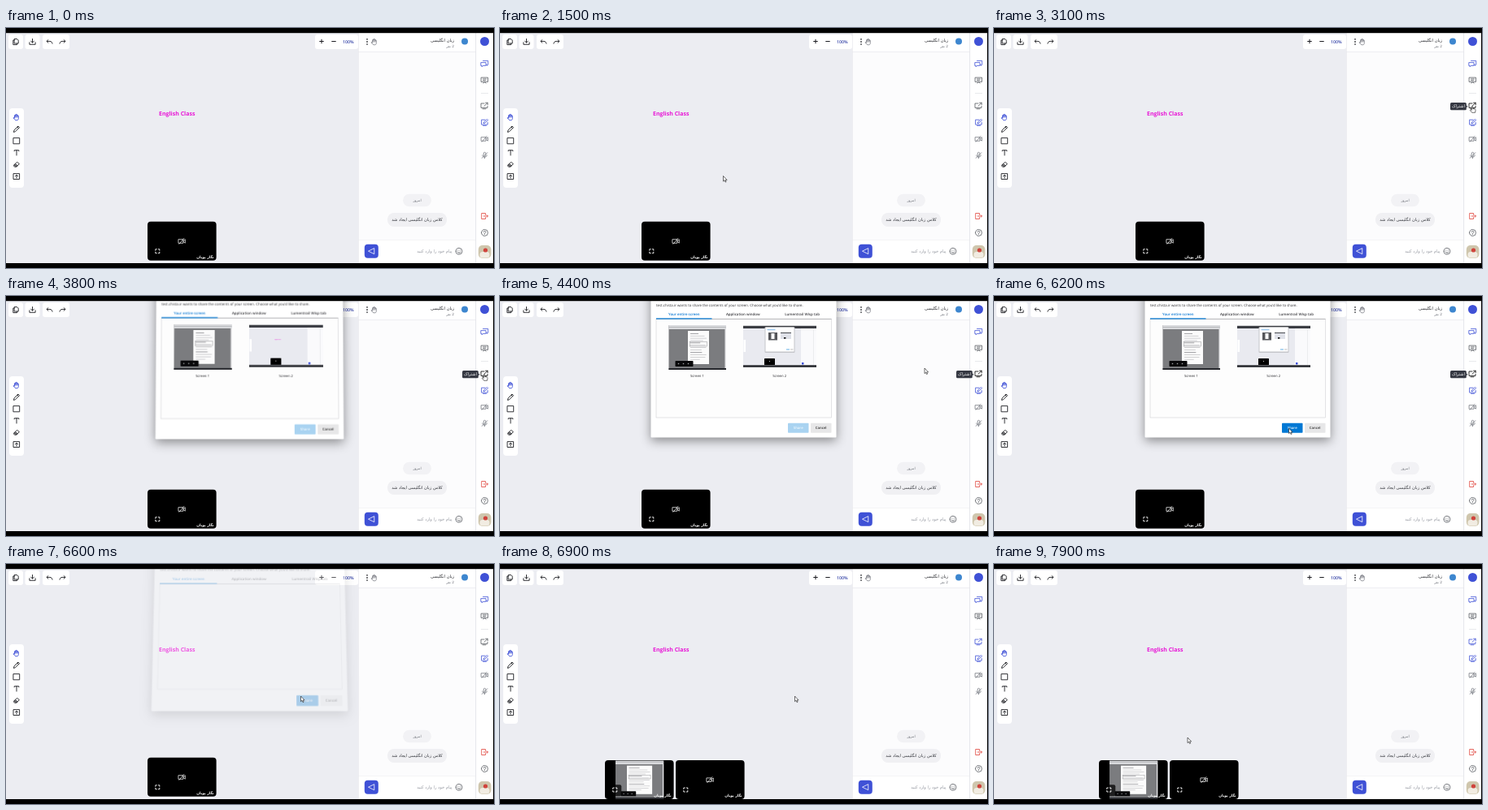
Animation, 600 px wide and 296 px high, one loop 8000 ms. Source, as an HTML page:

```html
<!DOCTYPE html>
<html lang="en">
<head>
<meta charset="utf-8">
<title>Online class: sharing a screen</title>
<style>
  html, body { margin: 0; width: 100%; height: 100%; overflow: hidden; background: #000; }
  #stage { position: fixed; left: 0; top: 0; width: 600px; height: 296px; overflow: hidden; contain: strict; }
  svg, #dialog { position: absolute; left: 0; top: 0; width: 600px; height: 296px; }
  svg { display: block; overflow: hidden; }
  #dialog { transform-origin: 299.5px 96.5px; }
  #dialog svg { overflow: visible; filter: drop-shadow(0 4px 6.5px rgba(0,0,0,.42)); }
  text { font-family: "Open Sans", "Noto Sans", sans-serif; text-rendering: geometricPrecision; }
  .fa { font-family: "DejaVu Sans", sans-serif; direction: rtl; }
  .mid { text-anchor: middle; }
</style>
</head>
<body>
<div id="stage">
  <svg id="room" viewBox="0 0 600 296"></svg>
  <div id="dialog"><svg id="sheet" viewBox="0 0 600 296"></svg></div>
  <svg id="front" viewBox="0 0 600 296"></svg>
</div>
<script>
const LOOP = 8000, STEP = 100;
const BLUE = '#3f51d6', GREY = '#55585f', INK = '#1c1d22';
const $ = id => document.getElementById(id);

const box = (x, y, w, h, fill, r = 0, extra = '') =>
  `<rect x="${x}" y="${y}" width="${w}" height="${h}" rx="${r}" fill="${fill}" ${extra}/>`;
const dot = (x, y, r, fill) => `<circle cx="${x}" cy="${y}" r="${r}" fill="${fill}"/>`;
const label = (x, y, size, fill, str, cls = '', weight = 400) =>
  `<text x="${x}" y="${y}" font-size="${size}" fill="${fill}" class="${cls}" font-weight="${weight}">${str}</text>`;
const icon = (name, x, y, color, width = .9, id = '') =>
  `<path ${id && `id="${id}"`} transform="translate(${x} ${y})" d="${ICONS[name]}" fill="none" stroke="${color}"
    stroke-width="${width}" stroke-linecap="round" stroke-linejoin="round"/>`;

const ICONS = {
  copy: 'M-1.5,-3.5H1.6L3.2,-1.9V2H-1.5ZM-1.6,-2H-3.2V3.6H1.6V2.2',
  save: 'M0,-3.6V1M-1.9,-.9L0,1.1L1.9,-.9M-3.6,.8V3.3H3.6V.8',
  undo: 'M-1.6,-2.4L-3.5,-.6L-1.6,1.2M-3.4,-.6H.4C2,-.6 3.2,.4 3.5,2.2',
  redo: 'M1.6,-2.4L3.5,-.6L1.6,1.2M3.4,-.6H-.4C-2,-.6 -3.2,.4 -3.5,2.2',
  plus: 'M-2.3,0H2.3M0,-2.3V2.3',
  minus: 'M-2.3,0H2.3',
  palm: 'M-2.5,.6V-2a.6.6 0 011.2 0V-3a.6.6 0 011.2 0V-2.6a.6.6 0 011.2 0V-1.5a.6.6 0 011.2 0V1.5C2.3,3.3 1.3,3.8 0,3.8C-1.6,3.8 -2.4,3 -4,.8C-3.6,.2 -3,.4 -2.5,1ZM-1.3,-2V0M-.1,-2.6V0M1.1,-2V0',
  pencil: 'M-3.5,3.5L-2.9,1.2L2,-3.6L3.6,-2L-1.2,2.9ZM1,-2.6L2.6,-1',
  square: 'M-3.7,-3.6H3.7V3.6H-3.7Z',
  type: 'M-2.8,-2V-3H2.8V-2M0,-3V3.2',
  eraser: 'M-3.4,.9L.6,-3L3.4,-.8L-.4,2.8H-2.2ZM-1.6,-.8L1.2,1.4M-2.4,0L.3,2.1M-2.9,.6L-.4,2.5',
  upload: 'M-3.6,-3.4H3.6V3.5H-3.6ZM0,2V-1.6M-1.6,-.2L0,-1.8L1.6,-.2',
  chat: 'M-2,-3.6H4.2V1.2H3.2V2.4L1.8,1.2M-4.3,-1.4H1.6V2.4H-2L-3.4,3.9V2.4H-4.3Z',
  board: 'M-4,-3.4H4V1.9H-4ZM-2,-1.6H2M-2,.1H1M-1.6,3.7L0,2L1.6,3.7',
  share: 'M0,-3H-4V2.4H4V.4M-2,3.8H2M0,.2L4,-3.6M1.6,-3.8H4.2V-1.3',
  edit: 'M.6,-3.3H-3.9V2.6H3.7V0M-2,3.9H2M-1.2,.8L-.8,-.7L3,-4L4.2,-2.8L.4,.5Z',
  camera: 'M-4,-2.3H1.6V2.3H-4ZM1.6,-.5L4,-2.2V2.2L1.6,.5M-3.4,3.4L2.6,-3.6',
  mic: 'M-1.3,-2.4a1.3 1.3 0 012.6 0V.2a1.3 1.3 0 01-2.6 0ZM-2.8,0C-2.6,3 2.6,3 2.8,0M0,2.3V3.8M-3.3,3.4L3.3,-3.3',
  exit: 'M1,-1.7V-3.5H-3.8V3.5H1V1.7M-1.2,0H4M2.5,-1.5L4,0L2.5,1.5',
  help: 'M-4,0a4 4 0 108 0a4 4 0 10-8 0M-1.3,-.9C-1.3,-2.7 1.4,-2.6 1.3,-.9C1.2,0 0,0 0,1M0,2.1V2.2',
  smile: 'M-3.9,0a3.9 3.9 0 107.8 0a3.9 3.9 0 10-7.8 0M-1.9,.9C-1.2,2.5 1.2,2.5 1.9,.9M-1.3,-1.2V-1M1.3,-1.2V-1',
  send: 'M3.4,-3.4L-3.5,0L3.4,3.4Z',
  full: 'M-2.5,-1V-2.5H-1M1,-2.5H2.5V-1M2.5,1V2.5H1M-1,2.5H-2.5V1'
};

// A desktop with a document open, 70.5 by 55 units
function desktop(pageX, pageW) {
  let s = box(0, 0, 70.5, 55, '#7b7c7f') + box(0, 0, 70.5, 5, '#d9dadd') +
    box(0, 2, 70.5, .5, '#9a9ca0') + box(69, 5, 1.5, 48, '#e8e8ea') +
    box(pageX, 7, pageW, 41, '#fbfbfb');
  for (let i = 0; i < 12; i++) {
    const w = (pageW - 6) * (.5 + .5 * Math.abs(Math.sin(i * 2.3)));
    s += box(pageX + 3, 10 + i * 2.9, w, .6, i % 4 ? '#b4b4b8' : '#6b6b70');
  }
  s += box(pageX + 2.5, 20.5, pageW - 5, 5.5, 'none', 0, 'stroke="#77787c" stroke-width=".4"');
  s += box(0, 53, 70.5, 2, '#25272c') + box(8, 44, 22, 7, '#08080a', .8);
  return s + [12, 18, 24].map(x => dot(x, 47.5, .8, '#a6a7aa')).join('');
}

const tileMarks = icon('full', 12, 36.3, '#fff', .9) +
  label(81.3, 44.8, 4.4, '#fff', 'نگار پویان', 'fa', 700);
const tile = (x, y, inner) =>
  `<g transform="translate(${x} ${y})">${box(-.3, -.2, 84.6, 48, '#000', 4)}${inner}${tileMarks}</g>`;
const cameraTile = (x, y) => tile(x, y, icon('camera', 42, 24, '#e8e8e8', .8));

function drawRoom() {
  const tools = ['palm', 'pencil', 'square', 'type', 'eraser', 'upload'];
  const side = [['chat', 44, BLUE], ['board', 64.5, GREY], ['edit', 116.5, BLUE], ['camera', 137, '#777a82'],
    ['mic', 157, '#777a82'], ['exit', 232, '#e0433a'], ['help', 252.5, GREY]];
  $('room').innerHTML =
    box(0, 6, 600, 285, '#ecedf2') +
    box(3, 8, 18, 18, '#fff', 3) + box(23.5, 8, 18, 18, '#fff', 3) + box(45, 8, 33, 18, '#fff', 3) +
    box(380, 8, 53, 18, '#fff', 3) +
    icon('copy', 12, 17, INK) + icon('save', 32.5, 17, INK) + icon('undo', 53.5, 17, INK) + icon('redo', 69.5, 17, INK) +
    icon('plus', 388, 16.5, INK, 1) + icon('minus', 403, 16.5, INK, 1) +
    label(414, 18.5, 5.3, '#3645a8', '100%', '', 600) +
    box(4, 99, 18, 98, '#fff', 4) +
    tools.map((n, i) => icon(n, 13, 110 + i * 14.6, i ? INK : BLUE)).join('') +
    label(188, 108.2, 7, '#e815d6', 'English Class', '', 700) +

    box(433, 6, 167, 285, '#fcfcfd') + box(433, 6, 144, 23, '#fff') + box(433, 261, 144, 30, '#fff') +
    box(578, 6, 22, 285, '#fff') +
    box(433, 29, 144.5, .6, '#e7e7ec') + box(433, 261, 144.5, .6, '#ededf1') +
    box(577.3, 6, .8, 284, '#dfe0e6') + box(433, 6, .6, 284, '#e4e4ea') +
    [13.8, 16.9, 20].map(y => dot(444, y, .85, INK)).join('') +
    icon('palm', 453, 17, '#6b6e76', .7) +
    label(551, 16.6, 5.2, '#26272c', 'زبان انگلیسی', 'fa') +
    label(551, 24.2, 4.3, '#6f727a', '2 نفر', 'fa') +
    dot(564, 16.5, 4, '#3d86cf') + dot(588.5, 16.5, 5.5, BLUE) +

    box(488, 204.7, 35, 15.5, '#f2f2f5', 7.7) +
    label(505.5, 214, 4.4, '#6f727a', 'امروز', 'fa mid') +
    box(469, 228, 73, 17, '#f0f0f3', 8) +
    label(505.5, 238.3, 5.15, '#34363c', 'کلاس زبان انگلیسی ایجاد شد', 'fa mid') +
    box(440.8, 266.8, 17, 16.9, BLUE, 4) + icon('send', 449, 275.2, '#fff', .8) +
    label(548.5, 276.6, 5.15, '#9699a1', 'پیام خود را وارد کنید', 'fa') +
    icon('smile', 557, 275.3, GREY, .8) +

    side.map(([n, y, c]) => icon(n, 588.5, y, c, .8)).join('') +
    box(584, 80, 9, .6, '#d9dae0') + icon('share', 588, 96, GREY, .8, 'shareIcon') +
    box(580.8, 268, 15.6, 16, '#cfc6ad', 5) + box(582.5, 276, 12, 7.5, '#f1ece2', 3.5) +
    dot(589.5, 274, 2.6, '#d0433c') +

    `<g id="alone">${cameraTile(174.3, 239)}</g>
     <g id="sharing">${cameraTile(216.3, 242.2)}${tile(129.3, 242.2,
       `<g transform="translate(12.7 .5) scale(.84 .856)">${desktop(16.7, 37)}</g>` +
       box(4, 30, 16, 14, '#000', 2, 'opacity=".75"'))}</g>`;
}

function drawSheet() {
  const tab = (x, str, color) => label(x, 24.2, 4.4, color, str, 'mid', 600);
  const popup = box(325.5, 38.5, 37, 31.5, '#c4c5ca', 1) + box(326.5, 38.5, 35, 30, '#fff') +
    box(328.5, 41.5, 10, .6, '#2a86d6') + box(330, 45, 11, 9.5, '#55565a') + box(333.5, 46, 4, 7, '#fff') +
    box(345, 45, 13, 8, '#dfe1e8') + box(345, 45, 13, .8, '#25272c') + box(349, 51, 2.4, 1.6, '#000') +
    box(352, 65, 4, 1.8, '#a9d3f1') + box(357, 65, 3.5, 1.8, '#dcdcdc');
  $('sheet').innerHTML =
    box(185.5, -14, 228, 188.5, '#fff', 1) +
    label(192, 13, 4.38, '#2c2c30', "test.chista.ir wants to share the contents of your screen. Choose what you'd like to share.") +
    tab(226.3, 'Your entire screen', '#0a78d4') + tab(298.7, 'Application window', '#3c3c40') +
    tab(371.5, 'Lumentrail Wisp tab', '#3c3c40') +
    box(192, 28.3, 215.5, 121.7, '#fdfdfd', 0, 'stroke="#d0d0d4" stroke-width=".6"') +
    box(192, 27.9, 215.5, .7, '#a4a4a8') + box(192, 27.3, 68.5, 1.3, '#1583da') +
    `<g id="thumbs"><g transform="translate(207.5 36)">${desktop(23.5, 26)}</g>` +
    box(299, 36.8, 90, 51, '#e9eaf0') + box(299, 36.8, 90, 3.2, '#3b3d43') + box(370, 40, 19, 45, '#fafafc') +
    box(385.5, 40, .4, 45, '#d5d6dc') + box(299.5, 54, 2.5, 15, '#fff') + box(371, 82, 2.5, 2.5, BLUE) +
    label(330, 54.5, 1.2, '#e815d6', 'English Class', '', 700) +
    `<g id="popup">${popup}</g>` + box(325, 77, 13, 8, '#000', .6) + dot(331.5, 80.5, .6, '#ddd') +
    box(299, 85.3, 90, 2.5, '#25272c') +
    label(242.5, 100.1, 4.3, '#2c2c30', 'Screen 1', 'mid') + label(343.7, 100.1, 4.3, '#2c2c30', 'Screen 2', 'mid') + '</g>' +
    box(354, 156.7, 25.5, 12, '#a9d3f1', .8, 'id="shareButton"') +
    label(366.7, 164.2, 4.3, '#eef7fd', 'Share', 'mid', 600) +
    box(382, 156.7, 25.5, 12, '#e7e7e8', .8) + label(394.7, 164.2, 4.3, '#333', 'Cancel', 'mid', 600);
}

function drawFront() {
  const ink = 'fill="#fff" stroke="#111" stroke-width=".6" stroke-linejoin="round"';
  $('front').innerHTML =
    `<g id="tip">${box(561, 92, 19.8, 9.3, '#363943', 1.5)}<path d="M580.6,95L582.4,96.7L580.6,98.4Z" fill="#363943"/>
      ${label(570.9, 98.3, 5.1, '#fff', 'اشتراک', 'fa mid')}</g>` +
    box(0, 0, 600, 6.2, '#000') + box(0, 290, 600, 6, '#000') + box(599, 0, 1, 296, '#000') +
    `<g id="cursor">
      <path id="arrow" ${ink} d="M0,0V6.6L1.5,5.2L2.6,7.6L3.6,7.1L2.6,4.9H4.6Z"/>
      <path id="hand" ${ink} d="M-.7,4.6V.7a.7.7 0 011.4 0V3L3.2,3.5C4,3.7 4.2,4.2 4.1,5L3.6,7.8H-.4L-2.6,5C-2.7,4.2 -1.8,3.9 -.7,4.9Z"/>
    </g>`;
}

// time, x, y of the pointer's hot spot
const PATH = [
  [800, 132, 271], [900, 150, 256], [1000, 184, 231], [1100, 203.5, 218], [1200, 203.5, 218],
  [1300, 217, 211], [1500, 274.5, 182.5], [1700, 375, 149], [1900, 507, 114], [2000, 560, 104],
  [2100, 585, 111], [2200, 586, 106], [2400, 588, 99], [2700, 588, 96.5], [4200, 588, 96.5],
  [4300, 574, 95], [4500, 470, 83], [4700, 340, 70], [4900, 256, 62], [5000, 247, 61], [5300, 247, 61],
  [5400, 250, 65], [5600, 274, 90], [5900, 336, 142], [6100, 360, 161], [6200, 362.5, 163], [7400, 362.5, 163],
  [7500, 350, 168], [7600, 318, 181], [7700, 279, 198], [7800, 248, 210], [7900, 238, 214]
];
// time, tilt, opacity of the share dialog
const SHEET = [
  [0, 0, 0], [3700, .8, .5], [3800, .27, 1], [3900, .06, 1], [4000, 0, 1], [6400, .12, 1],
  [6500, .55, .65], [6600, 1, .28], [6700, 1.15, .06], [6800, 0, 0]
];

function along(rows, t) {
  const i = rows.findIndex(r => r[0] > t);
  if (i < 0) return rows[rows.length - 1].slice(1);
  if (i === 0) return rows[0].slice(1);
  const [a, b] = [rows[i - 1], rows[i]], k = (t - a[0]) / (b[0] - a[0]);
  return [a[1] + (b[1] - a[1]) * k, a[2] + (b[2] - a[2]) * k];
}
const held = (rows, t) => rows.filter(r => r[0] <= t).pop();
const show = (id, on) => $(id).style.display = on ? '' : 'none';

function pose(t) {
  const [x, y] = along(PATH, t);
  const overIcon = t >= 2200 && t < 4300;
  $('cursor').setAttribute('transform', `translate(${x} ${y})`);
  show('cursor', t >= 800);
  show('arrow', !overIcon);
  show('hand', overIcon);

  const hover = t >= 2300 && t < 6500, live = t >= 6800;
  show('tip', hover);
  $('shareIcon').setAttribute('stroke', live ? BLUE : hover ? '#000' : GREY);
  show('alone', !live);
  show('sharing', live);

  const [, p, alpha] = held(SHEET, t);
  $('dialog').style.opacity = alpha;
  $('dialog').style.transform = p
    ? `perspective(800px) rotateX(${9 * p}deg) scale(${1 + .042 * p}, ${1 + .085 * p})` : 'none';
  show('dialog', alpha > 0);
  show('thumbs', t < 6500);
  show('popup', t >= 4300);
  $('shareButton').setAttribute('fill', t >= 5400 ? '#0078d4' : '#a9d3f1');
}

drawRoom();
drawSheet();
drawFront();
const start = performance.now();
function tick() {
  const t = (performance.now() - start) % LOOP;
  pose(Math.floor(t / STEP) * STEP);
  requestAnimationFrame(tick);
}
tick();
</script>
</body>
</html>
```
